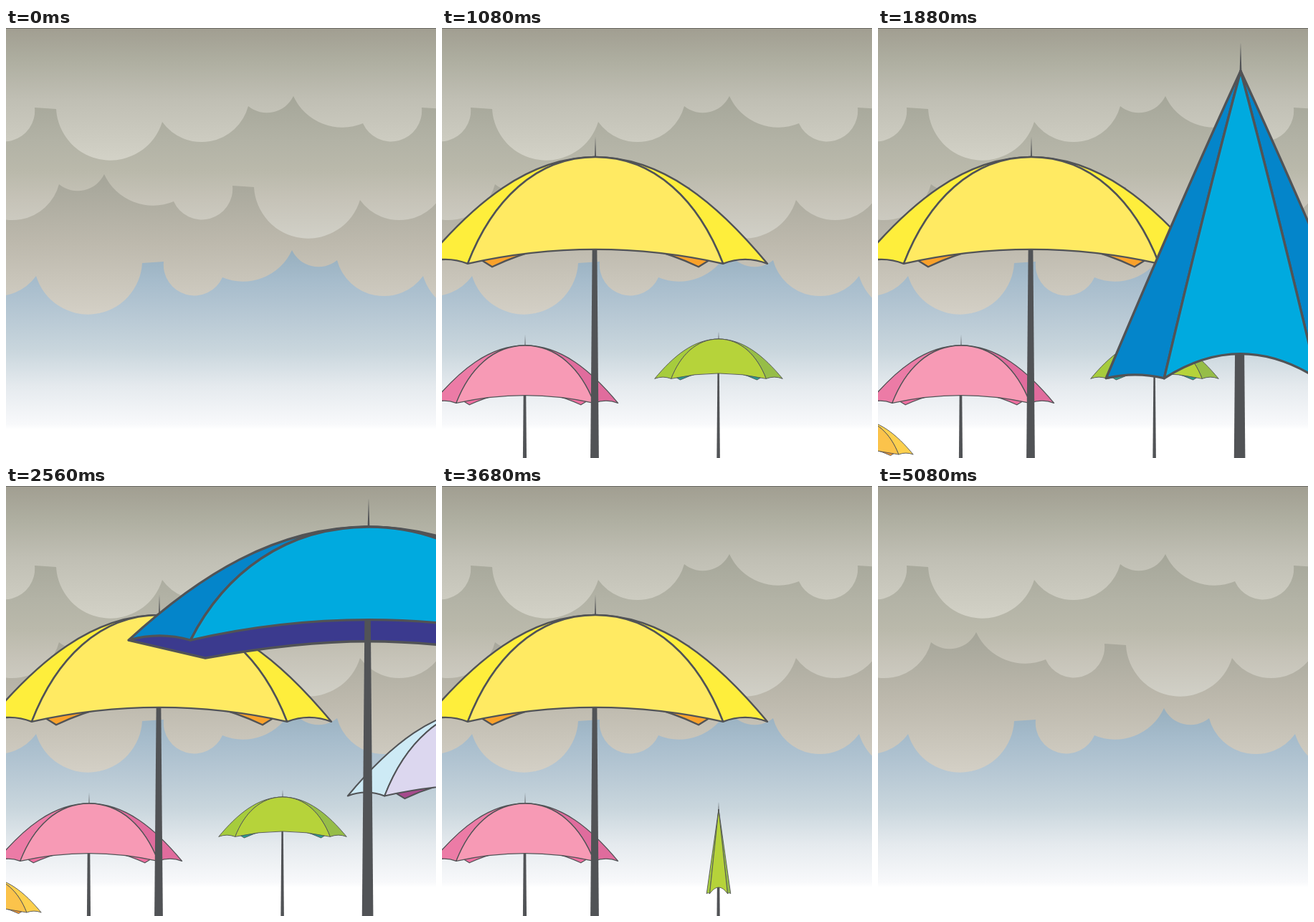
An HTML page with a canvas for the animation above (5.32 s loop, 600 px wide and 600 px high).

```html
<!DOCTYPE html>
<html lang="en">
<head>
<meta charset="utf-8">
<title>Umbrellas</title>
<style>
html, body { margin: 0; width: 100%; height: 100%; overflow: hidden; background: #fff; }
canvas { display: block; width: 600px; height: 600px; }
</style>
</head>
<body>
<canvas id="stage" width="600" height="600"></canvas>
<script>
const ctx = document.getElementById('stage').getContext('2d');
const LOOP = 5320, STEP = 40, PITCH = 440, CLOSE_START = 2560;
const INK = '#515356';

const lerp = (a, b, t) => a + (b - a) * t;
const clamp = v => Math.min(1, Math.max(0, v));
const smooth = v => { v = clamp(v); return v * v * (3 - 2 * v); };

function gradient(stops, shift = 0) {
  const g = ctx.createLinearGradient(0, -shift, 0, 600 - shift);
  for (const [y, color] of stops) g.addColorStop(y / 600, color);
  return g;
}

// One cloud bank: a repeating row of scallops, 540 px per repeat.
const scallops = 'l30 2 a75.7 75.7 0 0 0 148 18 a67.5 67.5 0 0 0 120 -22 ' +
  'a41 41 0 0 0 63 -14 a75 75 0 0 0 97 38 a43 43 0 0 0 82 -22 ';
const bank = new Path2D('M-500 111 ' + scallops.repeat(3) + 'V-400 H-500 Z');

const sky = [[310, '#97afbe'], [350, '#a5bbcb'], [400, '#b7c8d4'], [450, '#c9d6dd'],
  [500, '#e5eaee'], [553, '#f8f9fb'], [560, '#ffffff']];
const clouds = [
  { x: 260, y: 215, flip: -1, stops: [[205, '#a5a599'], [300, '#bdb9ad'], [400, '#d4d0c6']] },
  { x: 276, y: 109, flip: 1, stops: [[95, '#a5a699'], [160, '#b3b3a6'], [200, '#bab9ab'], [240, '#c6c3b8'], [293, '#d1d0c7']] },
  { x: 0, y: 0, flip: 1, stops: [[0, '#a19e91'], [45, '#aeaea0'], [100, '#c0bfb4'], [185, '#d3d2c7']] }
];

function drawBackground() {
  ctx.fillStyle = gradient(sky);
  ctx.fillRect(0, 0, 600, 600);
  for (const { x, y, flip, stops } of clouds) {
    ctx.save();
    ctx.translate(x, y);
    ctx.scale(flip, 1);
    ctx.fillStyle = gradient(stops, y);
    ctx.fill(bank);
    ctx.restore();
  }
  ctx.fillStyle = '#6c6b66';
  ctx.fillRect(0, 0, 600, 1);
}

// Back to front; turn is the place in the opening order.
const umbrellas = [
  { turn: 0, x: 116, top: 443, size: 0.54, main: '#f79ab5', left: '#ec7ba6', right: '#e06c9d', under: '#ee6fa0' },
  { turn: 3, x: -30, top: 546, size: 0.33, main: '#fbc34b', left: '#fdd04e', right: '#fdd04e', under: '#f0962e' },
  { turn: 2, x: 386, top: 434, size: 0.372, main: '#b6d33a', left: '#a6cc3d', right: '#96bd48', under: '#2a9d8f' },
  { turn: 1, x: 214, top: 180, size: 1, main: '#ffea62', left: '#feee3c', right: '#feee3c', under: '#f9a12b' },
  { turn: 3, x: 676, top: 309, size: 0.83, main: '#dcd7ef', left: '#cdeaf5', right: '#cdeaf5', under: '#a64a8c' },
  { turn: 4, x: 506, top: 57, size: 1.396, main: '#00aadf', left: '#0485ca', right: '#0485ca', under: '#3b3a8e', low: true }
];

// drop: 0 in place, 1 below the stage; open: 0 folded, 1 spread.
function pose(turn, time) {
  if (time < CLOSE_START) {
    const t = time - turn * PITCH;
    return { drop: (1 - clamp(t / 145)) ** 3, open: smooth((t - 60) / 127) };
  }
  const t = time - CLOSE_START - (4 - turn) * PITCH;
  return { drop: clamp((t - 200) / 140) ** 2, open: 1 - smooth((t - 40) / 200) };
}

function drawUmbrella(u, { drop, open }) {
  if (drop >= 1) return;
  const bend = open ** 4, spread = bend * bend;
  const full = 240 * u.size;
  const w = full * lerp(0.188, 1, open);
  const h = full * lerp(1.317, u.low ? 0.472 : 0.62, bend);
  const rib = w * (0.742 - 0.7 * open * (1 - open));
  const mid = h * lerp(0.925, u.low ? 0.82 : 0.866, bend);
  const y = lerp(u.top, 645, drop);

  // Curve between a hem point and the apex, straight when folded.
  const c1 = (x, kx, ky) => [x * lerp(2 / 3, kx, bend), h * lerp(2 / 3, ky, bend)];
  const c2 = (x, kx) => [x * lerp(1 / 3, kx, bend), h * lerp(1 / 3, 0, bend)];
  const rise = (x, k1, ky, k2) => ctx.bezierCurveTo(...c1(x, k1, ky), ...c2(x, k2), 0, 0);
  const fall = (x, k1, ky, k2) => ctx.bezierCurveTo(...c2(x, k2), ...c1(x, k1, ky), x, h);
  const OUTER = [0.71, 0.436, 0.39], INNER = [0.81, 0.41, 0.465];

  const paint = color => {
    ctx.closePath();
    ctx.fillStyle = color;
    ctx.fill();
    ctx.stroke();
  };

  ctx.save();
  ctx.translate(u.x, y);
  ctx.strokeStyle = INK;
  ctx.lineWidth = Math.max(0.9, 2.4 * u.size);
  ctx.lineJoin = 'round';

  // The underside tucks in behind the canopy while folded.
  const underX = w * lerp(0.6, 1, spread), underY = h * lerp(0.8, 1, spread);
  const [startX, startY, tipX, tipY, innerY] =
    u.low ? [1, 1, 0.68, 1.158, 1.01] : [0.66, 0.97, 0.6, 1.03, 0.8];
  for (const side of [-1, 1]) {
    const edge = new Path2D();
    edge.moveTo(side * startX * underX, startY * underY);
    edge.lineTo(side * tipX * underX, tipY * underY);
    edge.quadraticCurveTo(side * 0.3 * underX, innerY * underY, 0, innerY * underY);
    const area = new Path2D(edge);
    area.lineTo(0, mid * 0.5);
    ctx.fillStyle = u.under;
    ctx.fill(area);
    ctx.stroke(edge);
  }

  const poleX = -u.size, end = 610 - y;
  const poleHalf = d => (4.4 * u.size + 0.0175 * d) / 2;
  if (end > mid) {
    ctx.beginPath();
    ctx.moveTo(poleX - poleHalf(mid), mid - 2);
    ctx.lineTo(poleX + poleHalf(mid), mid - 2);
    ctx.lineTo(poleX + poleHalf(end), end);
    ctx.lineTo(poleX - poleHalf(end), end);
    ctx.fillStyle = INK;
    ctx.fill();
  }

  for (const [side, color] of [[-1, u.left], [1, u.right]]) {
    ctx.beginPath();
    ctx.moveTo(side * w, h);
    rise(side * w, ...OUTER);
    fall(side * rib, ...INNER);
    ctx.quadraticCurveTo(side * (rib + w) / 2, h * lerp(0.98, 0.92, bend), side * w, h);
    paint(color);
  }

  ctx.beginPath();
  ctx.moveTo(-rib, h);
  rise(-rib, ...INNER);
  fall(rib, ...INNER);
  ctx.quadraticCurveTo(0, 2 * mid - h, -rib, h);
  paint(u.main);

  const thin = Math.max(0.5, u.size);
  ctx.beginPath();
  ctx.moveTo(-thin, 0);
  ctx.lineTo(0, -28.5 * u.size);
  ctx.lineTo(thin, 0);
  ctx.fillStyle = INK;
  ctx.fill();
  ctx.restore();
}

function frame(now) {
  const time = Math.floor((now % LOOP) / STEP) * STEP;
  drawBackground();
  for (const u of umbrellas) drawUmbrella(u, pose(u.turn, time));
  requestAnimationFrame(frame);
}
frame(0);
</script>
</body>
</html>
```
